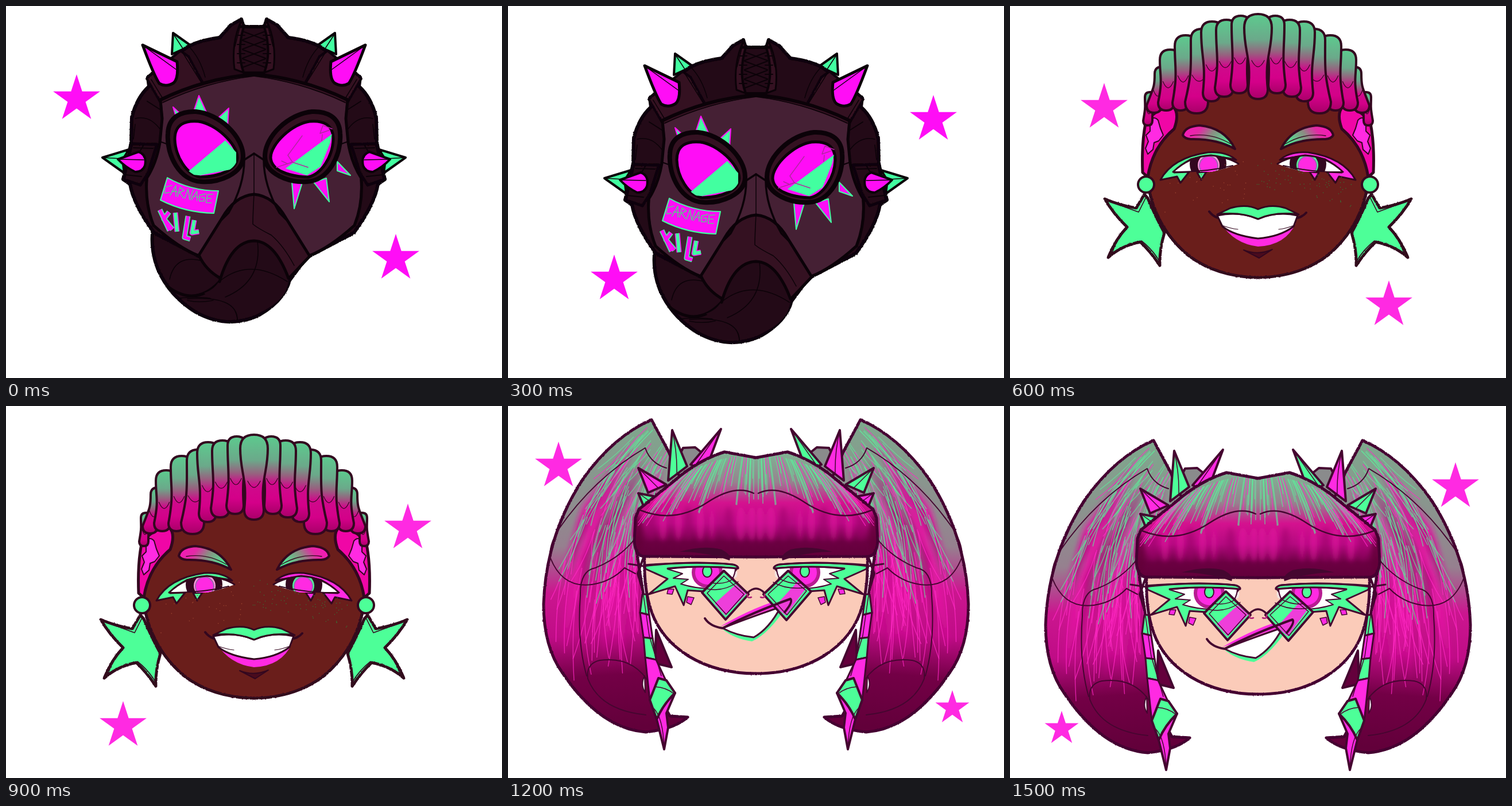
These frames come from a looping animation (864x648 px, 1800 ms). An HTML page:

```html
<!DOCTYPE html>
<html lang="en">
<head>
<meta charset="utf-8">
<title>Three masks</title>
<style>
html, body { margin: 0; width: 100%; height: 100%; overflow: hidden; background: #fff; }
svg { display: block; width: 100%; height: 100%; stroke-linejoin: round; stroke-linecap: round; }
</style>
</head>
<body>
<svg id="stage" viewBox="0 0 864 648"></svg>
<script>
const W = 864, STEP = 300, LOOP = 1800, BOB = 36;
const MIRROR = `translate(${W}) scale(-1 1)`;

let seed = 7;
const rnd = (a = 0, b = 1) => {
  seed = (seed * 16807) % 2147483647;
  return a + (b - a) * seed / 2147483647;
};
const p = (d, fill = 'none', width = 0, stroke = 'none', extra = '') =>
  `<path d="${d}" fill="${fill}" stroke="${stroke}" stroke-width="${width}" ${extra}/>`;
// Smooth fill with a slightly ragged outline.
const rim = (d, fill, width, ink) => p(d, fill) + p(d, 'none', width, ink, 'filter="url(#rough)"');
const flip = s => `<g transform="${MIRROR}">${s}</g>`;
const both = s => s + flip(s);
const clip = (id, s) => `<g clip-path="url(#${id})">${s}</g>`;
const soft = s => `<g filter="url(#soft)">${s}</g>`;
const clipDef = (id, d) => `<clipPath id="${id}"><path d="${d}"/></clipPath>`;
const grad = (id, box, stops, units = '') => {
  const [x1, y1, x2, y2] = box;
  return `<linearGradient id="${id}" x1="${x1}" y1="${y1}" x2="${x2}" y2="${y2}" ${units}>` +
    stops.map(([o, c]) => `<stop offset="${o}" stop-color="${c}"/>`).join('') + '</linearGradient>';
};
const mix = (a, b, t) => a + (b - a) * t;
const bend = (a, b, c, t) => mix(mix(a, b, t), mix(b, c, t), t);
const at = ([x, y]) => `${x.toFixed(1)} ${y.toFixed(1)}`;
const star = (x, y, r, color) => {
  const pts = Array.from({ length: 10 }, (_, i) => {
    const a = i * Math.PI / 5, k = i % 2 ? r * 0.382 : r;
    return at([x + k * Math.sin(a), y - k * Math.cos(a)]);
  });
  return p(`M${pts.join('L')}Z`, color);
};

function gasMask() {
  const ink = '#0b0208', dark = '#230a17', mid = '#341121', face = '#452034';
  const pink = '#ff0df6', green = '#42ffa0';
  const line = (d, w = 5) => p(d, 'none', w, ink);
  const lens = 'M294 232C294 206 312 199 335 201C365 205 403 240 403 264C402 286 372 297 338 298C314 293 295 262 294 232Z';
  const ring = 'M282 222C283 192 307 183 331 184C372 188 413 227 413 262C413 293 370 308 340 306C303 305 279 260 282 222Z';

  const hose = rim('M256 385Q250 432 270 470Q290 508 330 533Q385 564 440 539Q485 513 494 478L522 440 400 400Z', dark, 6, ink) +
    line('M282 489Q330 525 372 480') +
    line('M285 476Q295 430 345 445M300 509Q402 500 403 547M316 513Q350 520 385 505', 1.5);
  const backSpikes = both(
    p('M291 47L289 84 322 69Z', green, 4, ink) + line('M291 48L308 74', 1.5) +
    p('M168 264L214 250 203 268 206 291Z', green, 4, ink) + line('M168 264L202 266', 1.5));
  const hood = both(rim('M432 36L414 36 410 23 392 33 372 55Q340 59 318 70L298 84 247 124 249 140Q227 160 219 195L218 238 213 262 204 302 216 310Q222 346 258 395L336 436 432 436', dark, 6, ink));
  const panels = both(
    p('M410 25Q392 65 398 110L414 116Q401 78 415 38Z', mid, 3, ink) +
    rim('M304 78L245 126 268 166 343 134 318 88Z', mid, 4, ink) +
    p('M432 120Q345 128 269 164L272 175Q350 138 432 128', mid) +
    line('M432 119Q345 126 268 164', 6) +
    line('M318 70Q338 90 347 124M307 80L340 133M410 26L399 70M253 128L273 161M225 196Q250 190 268 214M225 206L222 232', 1.5) +
    p('M432 123Q350 132 272 170L274 195 270 236Q264 274 248 300Q244 340 257 381Q300 421 336 435L372 377 432 328', face) +
    line('M432 122Q350 132 273 168', 1.5) +
    line('M269 165L272 196 268 238Q262 274 245 300Q242 345 257 382Q300 421 336 435') +
    line('M268 236L282 241M246 166L268 180', 2) +
    rim('M219 240L263 241 247 292 234 312 205 302 214 262Z', dark, 5, ink) +
    line('M222 247L256 248M208 294L236 297M240 242L232 255', 2) +
    p('M195 267L231 254Q246 259 242 278Q238 289 225 289Q207 280 195 267Z', pink, 4, ink) +
    line('M195 267L240 268', 1.5) +
    p('M238 68L298 97Q301 126 292 134Q279 142 267 135Q258 122 238 68Z', pink, 5, ink) +
    line('M239 69L297 111', 1.5));
  let lace = '';
  for (let y = 44; y < 105; y += 16) lace += `M412 ${y}L452 ${y + 15}M452 ${y}L412 ${y + 15}M403 ${y + 7}L416 ${y + 7}M461 ${y + 7}L448 ${y + 7}`;
  const laces = p('M414 37H450Q463 80 450 116H414Q401 80 414 37Z', dark, 4, ink) + line(lace, 2) + line('M408 36H456');
  const marks =
    p('M291 176L304 188 297 196ZM326 186L336 156 350 187ZM366 198L388 178 386 210Z', green, 2, pink) +
    p('M498 307L502 353 516 308ZM536 307L563 341 558 300ZM577 271L600 295 577 287Z', pink, 2, green);
  const nose =
    both(p('M432 328Q398 331 376 370L336 434Q347 459 373 474L432 474', mid) +
      line('M432 328Q398 331 376 370L336 434') +
      line('M432 257L415 268Q415 312 388 360L376 372', 3.5)) +
    line('M336 434Q347 459 373 474M530 435L494 473') +
    p('M373 476Q392 410 432 409Q468 410 492 474Q492 512 440 535Q400 545 345 500Q365 493 373 476Z', dark) +
    line('M372 480Q392 410 432 409Q468 410 492 474') +
    line('M432 258V328Q430 365 430 380Q440 388 462 399Q484 418 502 452M374 478Q425 438 490 480M438 410Q447 480 382 507M316 510Q402 504 403 546', 1.5);
  const shine = d => clip('lens', p(d, green));
  const frames = both(p(ring, mid, 8, ink) + p(lens, pink, 5, ink));
  const shines = shine('M312 293L382 234 401 255V283L338 295Z') + flip(shine('M377 283L296 223 300 240 316 280 340 295Z'));
  const cracks = p('M516 226L491 260 499 272 471 281M499 272L526 281M491 275L480 270M568 214L552 208 547 222 564 216M551 224L550 235', 'none', 1.5, '#b326a0');
  const patch = p('M281 299Q322 322 370 322L362 361Q312 360 269 338Z', pink, 2, green) +
    `<g transform="translate(279 306) rotate(13)">` +
    p('M11 4L0 10 2 20 10 17M12 22L18 3 22 21M13 14L23 13M25 21L26 4 34 8 27 13 36 21M38 21L40 4 47 21 49 3M50 21L56 4 60 20M51 14L61 14M72 5L62 10 64 20 72 18 71 12 66 13M84 3L75 6 76 20 85 18M75 12L83 11', 'none', 1.5, '#58c98c') + '</g>';
  const letter = (d, a, b) => p(d, 'none', 9, a) + p(d, 'none', 6, b);
  const word = `<g stroke-linecap="butt">` +
    letter('M268 355L285 391M284 359L275 371L290 389', green, pink) +
    letter('M295 360L298 393', pink, green) +
    letter('M317 366L311 403L321 406', green, pink) +
    letter('M328 373L324 395L336 393', pink, green) + '</g>';
  return clipDef('lens', lens) + hose + backSpikes + hood + panels + laces + marks + nose +
    frames + shines + cracks + patch + word;
}

function curlyHead() {
  const ink = '#33071f', skin = '#6a1e1b', pink = '#ff2ae2', green = '#4dff98';
  const line = (d, w = 4) => p(d, 'none', w, ink);
  const eye = 'M284 289Q312 262 350 260Q382 264 398 275Q375 284 350 289Z';
  const lock = (xt, yt, wt, xb, yb, wb) => {
    const h = yb - yt, x = (xt + xb) / 2, n = Math.min(wt, wb) * 0.65, y = yt + h * 0.6;
    const d = `M${xt - wt} ${yt + wt}Q${xt - wt} ${yt} ${xt} ${yt}Q${xt + wt} ${yt} ${xt + wt} ${yt + wt}` +
      `C${xt + wt} ${yt + h * .45} ${x + n} ${y - 12} ${xb + wb} ${yb - wb}Q${xb + wb} ${yb} ${xb} ${yb}` +
      `Q${xb - wb} ${yb} ${xb - wb} ${yb - wb}C${x - n} ${y - 12} ${xt - wt} ${yt + h * .45} ${xt - wt} ${yt + wt}Z`;
    return p(d, 'url(#lock)', 4, ink) + line(`M${x - n} ${y - 8}Q${x} ${y + 14} ${x + n} ${y - 8}`, 1.2);
  };
  const locks = [[244, 150, 9, 240, 208, 8], [264, 106, 12, 251, 186, 13], [279, 76, 18, 272, 182, 14],
    [306, 51, 19, 297, 182, 14], [334, 40, 19, 325, 187, 20], [352, 27, 19, 351, 166, 15],
    [377, 24, 18, 373, 158, 16], [402, 17, 16, 399, 152, 15]].map(a => lock(...a)).join('');

  const head = both(rim('M432 100L300 100 238 220Q228 280 244 328Q260 392 310 434Q360 472 432 473', skin, 5, ink));
  const sides = both(
    p('M236 205Q252 178 284 175Q296 187 286 214Q248 246 240 298L231 290Q229 240 236 205Z', '#f006a6', 5, ink) +
    p('M244 201Q250 190 258 199L262 213 267 225 259 235 251 238 249 250 240 258 236 248 241 236 237 225 244 218Z', pink, 2, ink));
  const earrings = both(
    rim('M234 328L220 352Q190 347 165 336Q180 362 204 385Q184 406 171 438Q195 417 227 411Q245 428 261 452Q260 425 269 395Q256 372 240 335Z', green, 5, ink) +
    line('M236 335L224 359 178 342M205 386Q182 411 178 432M229 409Q248 424 260 444', 1.6) +
    `<circle cx="237" cy="311" r="14" fill="${green}" stroke="${ink}" stroke-width="4"/>`);
  const hair = both(p('M432 30L345 40 270 95 242 180 270 172 320 160 432 145', 'url(#lock)') + locks) + lock(432, 14, 24, 432, 162, 17);
  const brows = both(p('M301 225Q304 210 330 208Q374 212 392 249Q360 231 315 232Q304 231 301 225Z', 'url(#brow)', 4, ink) +
    line('M314 226Q350 220 384 240', 1.3));
  const look = (shade, glint) =>
    p('M262 303Q283 264 345 255Q377 253 394 268Q350 257 315 267Q296 277 286 290L312 289 297 308 291 297ZM326 290L333 303 342 289Z', shade, 3, ink) +
    p(eye, '#fff') +
    clip('eye', `<circle cx="345" cy="275" r="32" fill="${ink}"/><circle cx="346" cy="277" r="19" fill="${glint}"/>` +
      `<circle cx="346" cy="278" r="16" fill="${pink}" stroke="#9b68b0" stroke-width="2"/>`) +
    line('M284 289Q312 262 350 260Q382 264 398 275', 3) + line('M284 289Q340 290 388 278', 2);
  let freckles = '';
  for (let i = 0; i < 100; i++) {
    const right = i > 28, u = rnd(), x = right ? 430 + u * 165 : 270 + u * 150;
    const y = right ? 290 + u * 35 + rnd(-25, 25) : 325 + rnd(-35, 40) - u * 25;
    freckles += `<circle cx="${x.toFixed(1)}" cy="${y.toFixed(1)}" r=".8" fill="${right ? '#397036' : '#9b4630'}"/>`;
  }
  const mouth =
    p('M367 378Q397 397 432 400Q470 397 498 378Q480 417 432 419Q390 414 367 378Z', pink) +
    p('M361 365Q400 357 432 371Q465 357 501 365L494 384Q470 402 432 405Q390 400 370 384Z', '#fff', 3, ink) +
    p('M361 363L384 352Q412 344 432 354Q454 344 480 352L503 363Q460 358 432 371Q402 358 361 363Z', green, 3, ink) +
    line('M347 358Q353 366 362 369M516 360Q510 367 501 369') +
    line('M369 382Q385 388 397 389M495 382Q480 388 468 389', 1.2) +
    p('M407 425Q432 435 457 424L434 439Z', '#4a0b1d', 2, ink);
  return clipDef('eye', eye) + head + sides + earrings + hair + brows +
    look(green, '#ff9bdc') + flip(look(pink, green)) + freckles + mouth;
}

function pigtailHead() {
  const ink = '#450630', pink = '#ff2ae2', green = '#4dff98';
  const line = (d, w = 4) => p(d, 'none', w, ink);
  const pony = 'M250 24Q185 52 132 125Q66 225 62 345Q62 420 95 465Q160 562 240 568Q290 563 313 542L282 540Q240 470 236 330L222 240 228 185 300 125 279 78Z';
  const fringe = 'M432 90L377 80Q330 95 290 130L228 180 222 195 220 236Q222 260 236 262L432 263';

  // Position inside the pigtail: u runs across it, v from the tie to the tip.
  const onPony = (u, v) => [
    mix(bend(250, 85, 62, v), bend(290, 220, 238, v), u),
    mix(bend(24, 150, 440, v), bend(80, 190, 460, v), u)];
  const strand = (a, b, c, color) =>
    p(`M${at(a)}Q${at(b)} ${at(c)}`, 'none', 1.4, color, 'opacity=".75"');
  let locks = '', ponyHair = '', streaks = '', fringeHair = '';
  for (let i = 0; i < 26; i++) {
    const u = rnd(.05, .95), v = rnd(.45, .75), [x, y] = onPony(u, v);
    locks += p(`M${at(onPony(u, v - .35))}L${at([x - 8, y])} ${at(onPony(u, v + .25))} ${at([x + 8, y])}Z`,
      i % 3 ? '#e616a6' : '#9c0a6c', 0, 'none', 'opacity=".6"');
  }
  for (let i = 0; i < 150; i++) {
    const u = rnd(.03, .97), v = rnd(0, .8), d = rnd(.12, .3), drift = rnd(-.12, .12);
    ponyHair += strand(onPony(u, v), onPony(u, v + d / 2), onPony(u + drift, v + d),
      v > .52 || i % 5 === 0 ? '#ff28c4' : '#63e39a');
  }
  for (let i = 0; i < 9; i++) {
    const x = 255 + i * 21 + rnd(-6, 6);
    streaks += `<ellipse cx="${x.toFixed(1)}" cy="205" rx="${rnd(4, 9).toFixed(1)}" ry="30" fill="${i % 3 ? '#f016aa' : '#9c0068'}" opacity=".5"/>`;
  }
  streaks += '<ellipse cx="222" cy="225" rx="14" ry="40" fill="#62003a" opacity=".8"/>';
  for (let i = 0; i < 75; i++) {
    const u = rnd(), x = 428 - u * 140, y = 86 + u * u * 45, len = rnd(25, 95);
    fringeHair += strand([x, y], [x - u * len * .5, y + len * .4], [x - u * len * .95, y + len], i % 3 ? '#63e39a' : '#ff28c4');
  }
  const tails = both(
    p(pony, 'url(#tail)') + clip('pony', soft(locks) + ponyHair) + rim(pony, 'none', 5, ink) +
    line('M276 108Q248 100 239 73Q150 125 88 215Q70 245 74 265Q95 318 146 311Q180 306 203 282L222 292M222 230Q195 265 152 282Q125 287 126 330Q120 410 137 470M248 486Q220 435 160 443Q136 448 139 475Q160 530 240 538', 2) +
    p('M292 98L305 73 326 72 346 88 300 130Z', '#8a8b8c', 4, ink) +
    p('M258 390L285 455 256 448Z', '#64003c', 4, ink) +
    p('M238 470Q230 485 239 499Z', '#fff', 2, ink));
  const horns = (a, b) =>
    p('M371 40L318 102 333 108 352 91Z', b, 4, ink) + p('M286 42L279 130 312 105Z', a, 4, ink) +
    p('M227 108L244 151 276 137Z', b, 4, ink) + p('M227 152L236 174 258 158Z', a, 4, ink) +
    line('M286 43Q295 80 294 119M370 41L326 104M228 109L262 143M229 153L247 166', 1.5);
  const face = both(rim('M432 255L238 255Q236 310 246 345Q260 402 315 436Q365 466 432 466', '#fbcbb9', 5, ink));
  const bangs = both(p(fringe, 'url(#bangs)') + clip('fringe', soft(streaks) + fringeHair) + rim(fringe, 'none', 5, ink) +
    line('M229 181Q290 206 347 168Q395 136 428 152', 2.5) +
    p('M299 254Q340 242 372 250Q390 259 386 269L365 262Q325 253 299 254Z', ink));

  const eye =
    p('M386 279Q404 284 398 298L372 310Z', '#f1e2df') +
    p('M238 277Q330 270 392 276Q400 278 400 282L385 300 342 323 313 321 306 347 291 314 245 328 278 301 240 284Z', green, 3, ink) +
    p('M278 284Q340 277 396 282Q396 302 376 316Q340 322 301 310L314 302 288 300 304 292Z', '#fff', 2, ink) +
    clip('iris', `<circle cx="347" cy="290" r="24" fill="${pink}" stroke="#b71c91" stroke-width="6"/>` +
      `<ellipse cx="347" cy="288" rx="8" ry="10" fill="${green}" stroke="${ink}" stroke-width="2"/>`) +
    line('M210 275L236 279Q320 269 390 276Q402 278 401 283Q330 277 278 283', 3) +
    p('M279 319L289 319 286 328 277 327ZM313 332L324 334 319 346 311 342Z', pink, 1.5, ink);
  const braid =
    p('M234 328H241L246 364 230 360Z', green, 3, ink) + p('M230 360L246 364 252 405 236 403Z', pink, 3, ink) +
    p('M236 403L252 405 258 442 239 438Z', green, 3, ink) + p('M239 438L258 442 275 478 262 474 247 512Z', pink, 3, ink) +
    p('M262 474L276 478 291 500Q270 520 259 546L247 512Z', green, 4, ink) +
    p('M259 546Q270 520 291 500L276 535 279 560 272 598Z', pink, 4, ink) +
    line('M256 489Q276 490 290 502M236 330L246 400 267 470M252 525Q270 540 272 596', 1.5) +
    line('M236 264L226 292 235 322', 4);
  const mouth =
    p('M374 389Q420 400 444 382L488 345Q455 397 425 410Q395 406 374 389Z', green) +
    p('M370 384Q430 348 492 332L476 348Z', pink) +
    p('M374 387Q405 374 475 350Q455 388 428 403Q398 400 374 387Z', '#fff', 3, ink);
  const smirk = line('M343 370Q352 384 374 387Q425 360 492 336Q497 341 482 359');
  const glass = (d, band, shine) => p(d, green) + p(band, pink, 0, 'none', 'opacity=".9"') + p(d, 'none', 4, ink) + line(shine, 1.5);
  const glasses =
    glass('M376 287L419 328 379 372 338 325Z', 'M360 344L397 311 415 327 379 365Z', 'M347 326L376 296 411 328 380 363ZM344 318Q375 325 401 306M353 308Q380 312 393 300') +
    glass('M488 287L445 328 485 373 528 323Z', 'M465 349L506 304 518 319 484 365Z', 'M453 328L488 296 520 322 486 364ZM462 307Q486 321 520 316M471 300Q494 312 512 308') +
    line('M418 325Q432 311 446 325', 3.5) +
    p('M417 328Q416 336 424 333M447 328Q448 336 440 333', 'none', 2.5, '#b32278');
  return clipDef('pony', pony) + clipDef('fringe', fringe) +
    clipDef('iris', 'M270 280H397V310Q350 325 300 310Z') +
    tails + horns(green, pink) + flip(horns(pink, green)) +
    face + both(eye) + bangs + both(braid) + mouth + glasses + smirk;
}

const user = 'gradientUnits="userSpaceOnUse"';
const defs = '<filter id="rough" x="-5%" y="-5%" width="110%" height="110%"><feTurbulence type="fractalNoise" baseFrequency=".35" numOctaves="1" seed="4"/>' +
  '<feDisplacementMap in="SourceGraphic" scale="2.5" xChannelSelector="R" yChannelSelector="G"/></filter>' +
  '<filter id="soft"><feGaussianBlur stdDeviation="4"/></filter>' +
  grad('lock', [0, 0, 0, 1], [[0, '#5ccb8e'], [.3, '#6ba98a'], [.46, '#97617f'], [.6, '#cf0a8b'], [.8, '#d40089'], [1, '#a80068']]) +
  grad('brow', [0, 0, 1, .35], [[0, '#ff10c0'], [.35, '#e32aa5'], [.6, '#8c8c83'], [1, '#4dea93']]) +
  grad('tail', [170, 40, 210, 560], [[0, '#7fa78d'], [.38, '#96808f'], [.53, '#cb168f'], [.68, '#bf0c86'], [.82, '#730046'], [1, '#62003a']], user) +
  grad('bangs', [0, 82, 0, 262], [[0, '#7fb393'], [.28, '#97828f'], [.48, '#d4128f'], [.68, '#b50980'], [.86, '#6b0042'], [1, '#62003a']], user);

const hot = '#ff2ae2', neon = '#ff0df6';
const scenes = [
  [gasMask(), star(123, 162, 43, neon) + star(679, 440, 43, neon)],
  [curlyHead(), star(164, 177, 43, hot) + star(660, 521, 43, hot)],
  [pigtailHead(), star(88, 105, 43, hot) + star(774, 526, 31, hot)]
];
const stage = document.getElementById('stage');
stage.innerHTML = `<defs>${defs}</defs>` + scenes.map(([head, stars]) =>
  `<g class="scene"><g>${head}</g><g>${stars}</g></g>`).join('');
const groups = [...stage.querySelectorAll('.scene')];

let shown = -1;
function draw(time) {
  const step = Math.floor((time % LOOP) / STEP);
  if (step === shown) return;
  shown = step;
  const down = step % 2;
  groups.forEach((g, i) => {
    g.style.visibility = i === step >> 1 ? 'visible' : 'hidden';
    g.setAttribute('transform', `translate(0 ${down * BOB})`);
    g.lastChild.setAttribute('transform', down ? MIRROR : '');
  });
}

const start = performance.now();
function tick() {
  draw(performance.now() - start);
  requestAnimationFrame(tick);
}
tick();
</script>
</body>
</html>
```
